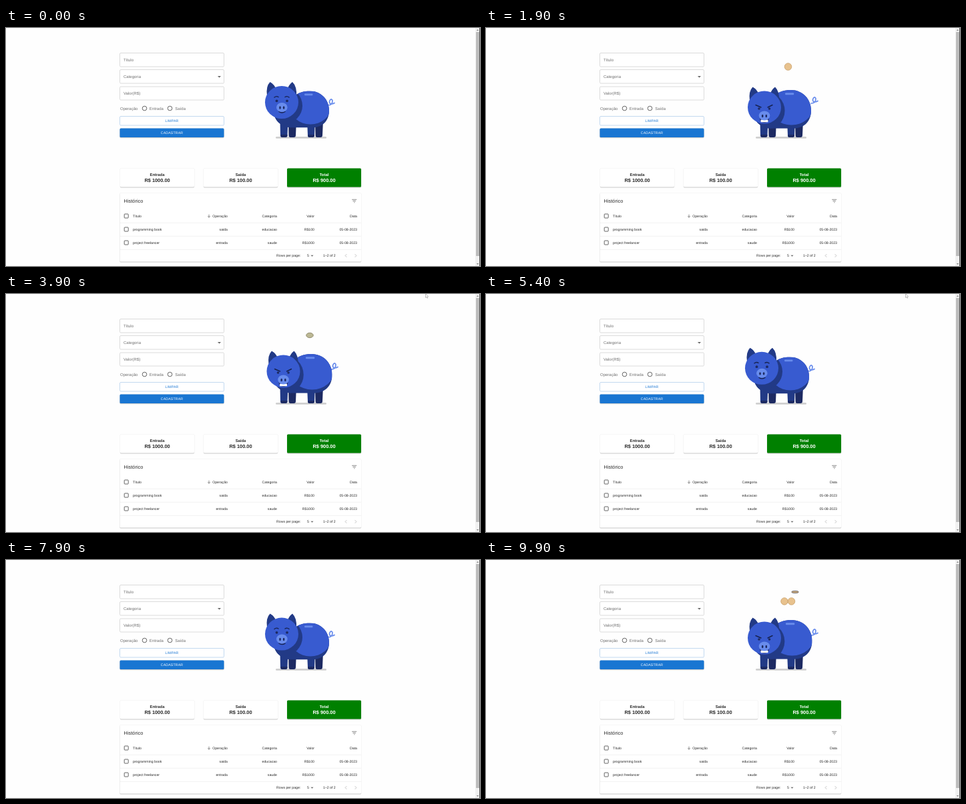
Recreate the animation shown at these times as an HTML page. Size 710 by 357 pixels, loop 10 s.

```html
<!DOCTYPE html>
<html lang="pt">
<head>
<meta charset="utf-8">
<style>
  html, body { margin: 0; width: 100%; height: 100%; overflow: hidden; background: #fefefe; }
  svg { display: block; }
  text { font: 5.2px "Liberation Sans", Arial, sans-serif; fill: #2a2a2a; text-rendering: geometricPrecision; }
  .label { font-size: 6px; fill: #707070; }
  .button { letter-spacing: .14px; }
  .mid { text-anchor: middle; }
  .end { text-anchor: end; }
  .name { font-size: 5.9px; font-weight: bold; }
  .sum { font-size: 7.4px; font-weight: bold; }
  .title { font-size: 7.4px; }
  .field { fill: #fff; stroke: #d2d2d2; stroke-width: .8; }
  .ring { fill: none; stroke: #555; stroke-width: .9; }
  .rule { stroke: #ebebeb; stroke-width: .7; }
  .white { fill: #fff; }
  .dark { fill: #223a86; }
  .deep { fill: #1d2a62; }
  .skin { fill: #385bd0; }
  .light { fill: #688cec; }
  .ink { fill: none; stroke: #17224f; stroke-width: 1.4; stroke-linecap: round; stroke-linejoin: round; }
</style>
</head>
<body>
<svg width="710" height="357" viewBox="0 0 710 357">
  <g id="papers"></g>

  <!-- form -->
  <rect class="field" x="170.5" y="37.5" width="156" height="20.5" rx="1.5"/>
  <rect class="field" x="170.5" y="62.5" width="156" height="20.5" rx="1.5"/>
  <rect class="field" x="170.5" y="88" width="156" height="20" rx="1.5"/>
  <text class="label" x="176" y="49.8">Título</text>
  <text class="label" x="176" y="75">Categoria</text>
  <text class="label" x="176" y="100">Valor(R$)</text>
  <path d="M317 72h5l-2.5 2.5z" fill="#666"/>
  <text class="label" x="171" y="122.5">Operação</text>
  <circle class="ring" cx="207.5" cy="120.5" r="3.3"/>
  <text class="label" x="214.8" y="122.5">Entrada</text>
  <circle class="ring" cx="245.5" cy="120.5" r="3.3"/>
  <text class="label" x="253.3" y="122.5">Saída</text>
  <rect x="170.5" y="132.5" width="156" height="13.5" rx="1.5" fill="#fff" stroke="#b4d0ec" stroke-width=".8"/>
  <text class="mid button" x="248.5" y="141.1" style="fill:#1976d2">LIMPAR</text>
  <text class="mid button white" x="248.5" y="159.1">CADASTRAR</text>

  <g id="cards"></g>

  <!-- history -->
  <text class="title" x="176.6" y="262.3">Histórico</text>
  <path d="M518.2 257.3h7M519.5 259.5h4.4M521 261.7h1.4" stroke="#666" stroke-width=".8"/>
  <path d="M304 279.8v4.3m-1.7-1.7l1.7 1.7l1.7-1.7" fill="none" stroke="#555" stroke-width=".7"/>
  <g id="rows"></g>
  <text x="405" y="343.3">Rows per page:</text>
  <text x="451" y="343.3">5</text>
  <path d="M456.5 340.7h4l-2 2z" fill="#666"/>
  <text x="475" y="343.3">1–2 of 2</text>
  <path d="M510.3 339.2l-2.2 2.3l2.2 2.3M522.7 339.2l2.2 2.3l-2.2 2.3" fill="none" stroke="#b5b5b5" stroke-width=".8"/>

  <!-- piggy bank -->
  <rect x="404" y="163" width="76" height="2.8" rx="1.4" fill="#cfcfcf"/>
  <path id="tail" d="M482 116Q489 116 489 109Q488 105.5 485.5 108Q483 112 486.500 114Q490 114 492 112.500" fill="none" stroke="#688cec" stroke-width="1.7" stroke-linecap="round"/>
  <g id="coins"></g>
  <path class="deep" d="M423 138h12l-1 23q0 3-3 3h-5q-2.500 0-2.500-3zM463 138h12l-1 23q0 3-3 3h-5q-2.500 0-2.500-3z"/>
  <path class="dark" d="M410.500 138h12l-1 23q0 3-3 3h-5q-2.500 0-2.500-3zM451 138h12l-1 23q0 3-3 3h-4.500q-2.500 0-2.500-3z"/>
  <path class="deep" d="M411.500 160h10v1q0 3-3 3h-4q-3 0-3-3zM452 160h10v1q0 3-3 3h-4q-3 0-3-3z"/>
  <clipPath id="trunk"><path d="M-24-20C-18-27-8-29 0-29C17-29 29-16 29 0C29 17 18 26 2 26H-26C-42 26-52 16-54 4z"/></clipPath>
  <g id="body" clip-path="url(#trunk)">
    <rect class="dark" x="-60" y="-30" width="90" height="60"/>
    <ellipse class="skin" cx="1" cy="-6" rx="31" ry="27"/>
    <circle class="dark" id="shade" r="27"/>
    <rect class="light" x="-8" y="-25" width="12.5" height="2.8" rx="1.2"/>
  </g>
  <g id="head">
    <path class="dark" d="M-22-10Q-24-24-17.500-30.500Q-11-27-8-19zM8-19Q11-27 16-30.500Q23-24 22-9z"/>
    <ellipse class="skin" rx="25" ry="24.500"/>
    <g id="calm">
      <path class="ink" d="M-11-7.500Q-8-10-5-8M5-8Q8-10 11-7.500"/>
      <circle class="deep" cx="-7.500" cy="-2.200" r="1.900"/><circle class="deep" cx="8" cy="-2.200" r="1.900"/>
      <path class="ink" d="M-4 14Q0 17 5 14"/>
    </g>
    <g id="eager">
      <path class="ink" d="M-13-3.500L-5 0M12-3.500L5 0"/>
      <circle class="deep" cx="-8" cy="2" r="1.800"/><circle class="deep" cx="7.500" cy="2" r="1.800"/>
      <path class="deep" d="M-7 15H7Q7 23 0 23Q-7 23-7 15z"/>
      <rect class="white" x="-5.500" y="18.500" width="11" height="3.800" rx="1"/>
    </g>
    <g id="snout">
      <ellipse class="light" rx="8.300" ry="7"/>
      <ellipse class="deep" cx="-2.800" cy=".5" rx="1.300" ry="2.200"/>
      <ellipse class="deep" cx="2.800" cy=".5" rx="1.300" ry="2.200"/>
    </g>
  </g>

  <!-- scrollbar and pointer -->
  <rect x="703" width="6" height="357" fill="#f1f1f1"/>
  <rect x="704" y="6" width="5" height="336" fill="#bdbdbd"/>
  <rect x="709" width="1" height="357" fill="#555"/>
  <path d="M704.800 4h3.400l-1.700-2zM704.800 353h3.400l-1.700 2z" fill="#8a8a8a"/>
  <path id="pointer" d="M628.500-.500v6l1.400-1.200l1 2l.9-.4l-.9-2h1.700z" fill="#fff" stroke="#999" stroke-width=".6"/>
</svg>
<script>
const $ = id => document.getElementById(id);
const LOOP = 10000, CYCLE = 2800, STEP = 100;

const paper = (x, y, w, h, fill = '#fff') => `
  <rect x="${x - .4}" y="${y - .2}" width="${w + .8}" height="${h + 1.6}" rx="1.8" fill="#ececec"/>
  <rect x="${x}" y="${y + .7}" width="${w}" height="${h}" rx="1.5" fill="#c8c8c8"/>
  <rect x="${x}" y="${y}" width="${w}" height="${h}" rx="1.5" fill="${fill}"/>`;

$('papers').innerHTML = paper(170.5, 150.5, 156, 13.5, '#1976d2') + paper(170.5, 247.5, 361.5, 103);

const cards = [['Entrada', '1000.00'], ['Saída', '100.00'], ['Total', '900.00']];
$('cards').innerHTML = cards.map(([name, sum], i) => {
  const x = 171 + 125 * i, mid = x + 55.5, total = i === 2, tone = total ? ' white' : '';
  return paper(x, 210.5, 111, 28, total ? '#008000' : '#fff') +
    `<text class="mid name${tone}" x="${mid}" y="221.5">${name}</text>
    <text class="mid sum${tone}" x="${mid}" y="231.2">R$ ${sum}</text>`;
}).join('');

const rows = [
  ['Título', 'Operação', 'Categoria', 'Valor', 'Data'],
  ['programming book', 'saida', 'educacao', 'R$100', '05-08-2023'],
  ['project freelancer', 'entrada', 'saude', 'R$1000', '05-08-2023']
];
const columns = [190, 332, 406, 462, 526];
$('rows').innerHTML = rows.map((row, i) => {
  const y = 282 + 20 * i;
  return `<path class="rule" d="M171 ${y + 10.3}H532"/>
    <rect class="ring" x="177.2" y="${y - 3}" width="6" height="6" rx=".8"/>` +
    row.map((s, j) => `<text class="${j ? 'end' : ''}" x="${columns[j]}" y="${y + 1.9}">${s}</text>`).join('');
}).join('');

// time, head x, head y, body x, body y, body radius, eagerness
const poses = [
  [0, 413, 111.5, 455, 123.5, 29, 0],
  [200, 413, 111.5, 455, 123.5, 29, 0],
  [600, 417, 118, 457, 121.5, 31, 1],
  [800, 417, 117, 457.5, 121, 31, 1],
  [1100, 415.5, 116, 457.5, 121, 31, 1],
  [1500, 417, 117, 457.5, 121, 31, 1],
  [1900, 417, 119, 456.5, 123.5, 30.5, 1],
  [2200, 413, 111, 455, 123.5, 29, 0],
  [2800, 413, 111.5, 455, 123.5, 29, 0]
];

// x, entry time, spin offset
const coins = [[455, 967, -.31], [459, 1120, 0], [447, 1367, -1.11], [457.5, 1367, -1.11], [463, 1460, 1.24], [452.5, 1793, -.89]];

function poseAt(t) {
  const i = poses.findIndex(p => p[0] > t), a = poses[i - 1], b = poses[i];
  const u = (t - a[0]) / (b[0] - a[0]), e = u * u * (3 - 2 * u);
  return a.map((v, k) => v + (b[k] - v) * e);
}

function coin([x, start, spin], t) {
  const age = t - start, y = 42 + .15 * age;
  if (age < 10 || y > 97) return '';
  const f = Math.max(.32, Math.abs(Math.cos(spin + age / 120)));
  const [fill, rim] = f < .4 ? ['#c9a878', '#454a60'] : f < .8 ? ['#bcb894', '#777052'] : ['#e8c28e', '#c39a62'];
  return `<ellipse cx="${x}" cy="${y}" rx="5.3" ry="${5.3 * f}" fill="${fill}" stroke="${rim}" stroke-width=".7"/>`;
}

const move = (id, x, y, s = 1) => $(id).setAttribute('transform', `translate(${x} ${y}) scale(${s})`);
const show = (id, on) => $(id).style.display = on ? '' : 'none';

function draw() {
  const now = Math.floor(performance.now() % LOOP / STEP) * STEP, t = now % CYCLE;
  const [, hx, hy, bx, by, r, eager] = poseAt(t);
  move('head', hx, hy);
  move('body', bx, by, r / 29);
  move('shade', hx - bx + 4, hy - by + 5);
  move('snout', .3 - .3 * eager, 7.5 + 5 * eager);
  move('tail', 5 * eager, -3 * eager);
  show('calm', eager < .5);
  show('eager', eager >= .5);
  show('pointer', now >= 3600 && now < 6000);
  $('coins').innerHTML = coins.map(c => coin(c, t)).join('');
  requestAnimationFrame(draw);
}
draw();
</script>
</body>
</html>
```
